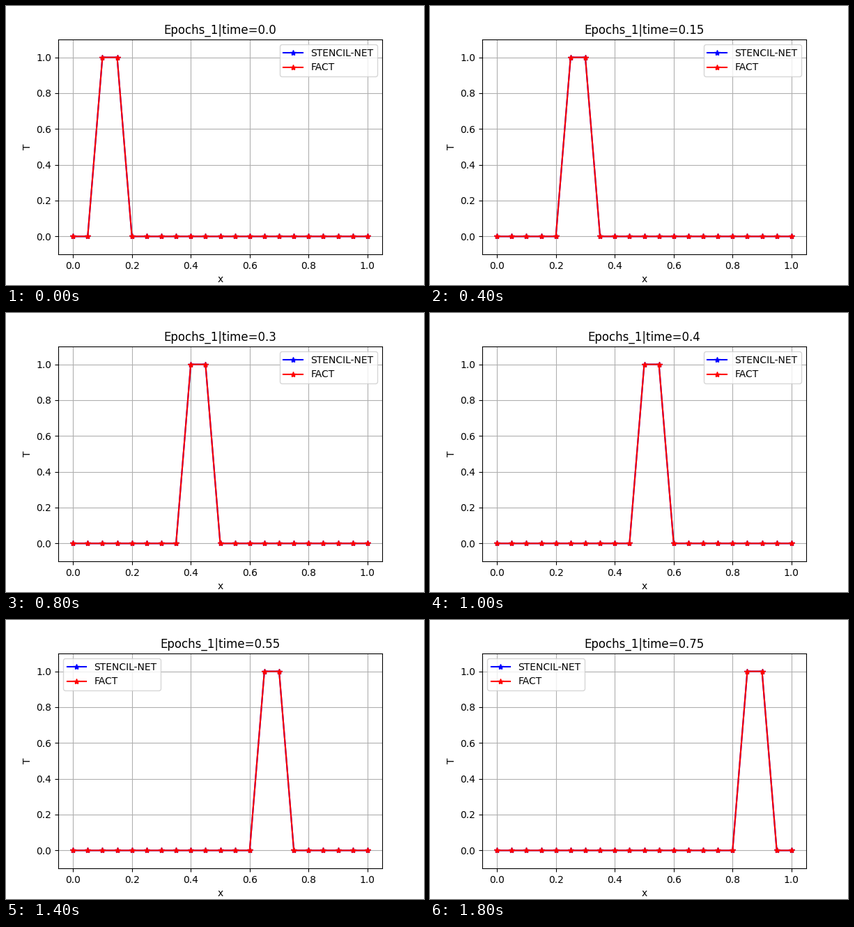
Write a matplotlib script that moves like this. It is 600 px wide and 400 px high and loops after 2 s.

```python
import matplotlib.pyplot as plt
import numpy as np
from matplotlib.animation import FuncAnimation

FRAMES = 10
INTERVAL = 200
DX = 0.05

cells = np.arange(21)
x = cells * DX


def pulse(step):
    """Two-cell square pulse shifted right by `step` cells."""
    return np.where((cells == step + 2) | (cells == step + 3), 1.0, 0.0)


fig, ax = plt.subplots(figsize=(6, 4), dpi=100)
lines = [
    ax.plot(x, pulse(0), "-*", color=color, label=label)[0]
    for color, label in (("blue", "STENCIL-NET"), ("red", "FACT"))
]
ax.set_xlim(-0.05, 1.05)
ax.set_ylim(-0.1, 1.1)
ax.set_xlabel("x")
ax.set_ylabel("T")
ax.grid(True)
title = ax.set_title("")
legend = ax.legend(loc="upper right")


def update(frame):
    # Snapshots fall on a coarser clock than the one-cell time step.
    step = 5 * frame // 3
    for line in lines:
        line.set_ydata(pulse(step))
    title.set_text(f"Epochs_1|time={round(step * DX, 2)}")
    # The legend moves aside once the pulse would run beneath it.
    legend.set_loc("upper right" if step <= 10 else "upper left")
    return [*lines, title, legend]


anim = FuncAnimation(
    fig, update, frames=FRAMES, init_func=lambda: update(0),
    interval=INTERVAL, repeat=True, repeat_delay=0,
)
plt.show()
```
